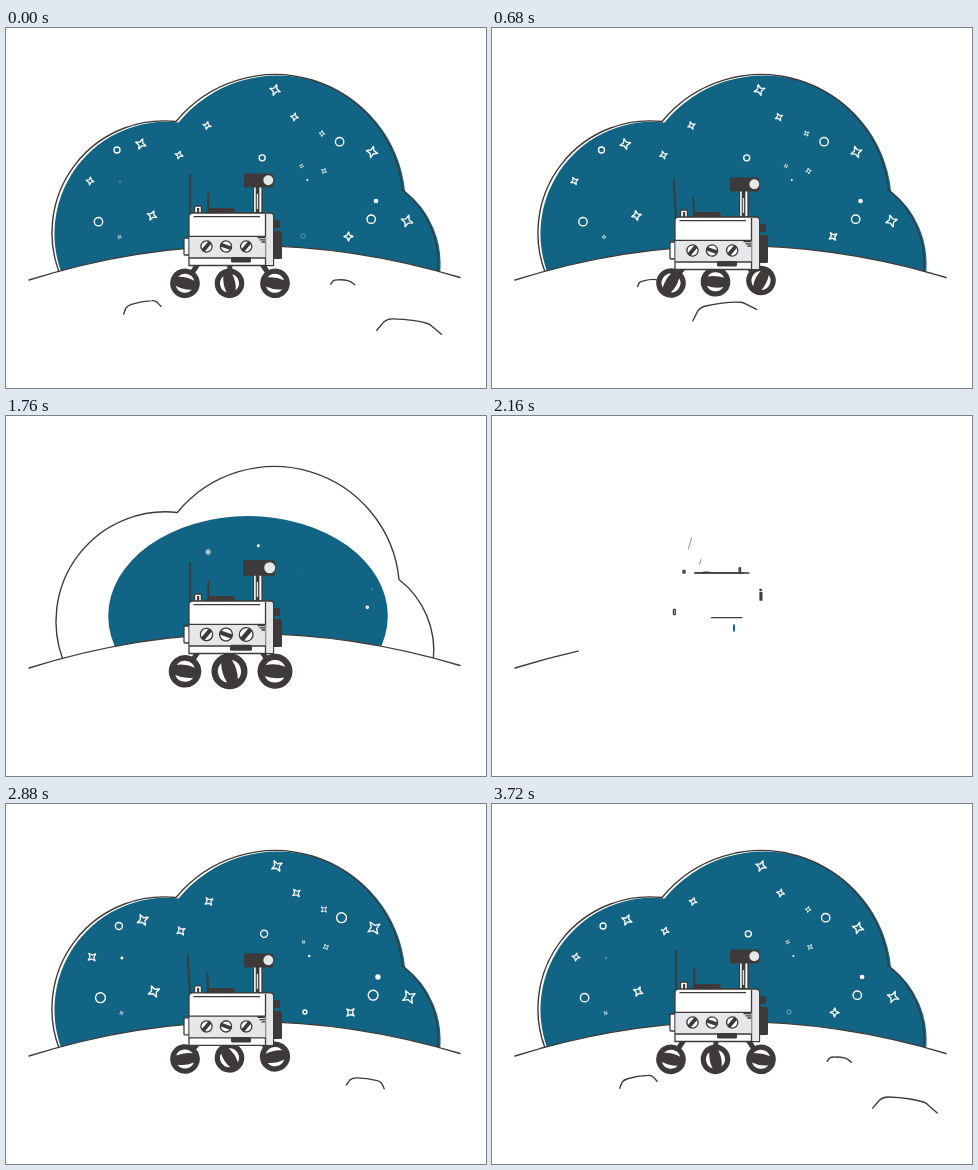
An HTML page that plays this animation: 480 px wide and 360 px high, repeating every 3.76 s.

```html
<!DOCTYPE html>
<html lang="en">
<head>
<meta charset="utf-8">
<title>Moon rover</title>
<style>
  html, body { margin: 0; width: 100%; height: 100%; overflow: hidden; background: #fff; }
  svg { display: block; width: 100vw; height: 100vh; }
  .ink { fill: none; stroke: #3d3a39; stroke-width: 1.4; stroke-linecap: round; stroke-linejoin: round; }
  .dark { fill: #3d3a39; }
  .white { fill: #fff; }
  .grey { fill: #e6e7e8; }
  .line { stroke: #3d3a39; stroke-width: 1.3; vector-effect: non-scaling-stroke; }
  .star { fill: none; stroke: #fff; stroke-width: 1.35; stroke-linejoin: round; vector-effect: non-scaling-stroke; }
  .leg { stroke: #3d3a39; stroke-width: 5; }
</style>
</head>
<body>
<svg viewBox="0 0 480 360">
  <defs>
    <path id="cloud" pathLength="1" d="M53 244A112 112 0 0 1 170 93.500A128 128 0 0 1 396.500 162A92 92 0 0 1 431.500 245"/>
    <clipPath id="iris"><ellipse id="hole" cx="242"/></clipPath>
    <clipPath id="skyClip"><use href="#cloud" transform="translate(2.500 1)"/></clipPath>
    <clipPath id="ground"><rect width="480" height="317.500"/></clipPath>
    <g id="wheel">
      <circle class="dark" r="14.800"/>
      <path class="white" d="M-8.300-4.600A9.500 9.500 0 0 1 8.300-4.600Q0-7-8.300-4.600ZM8.300 4.600A9.500 9.500 0 0 1-8.300 4.600Q0 7 8.300 4.600Z"/>
    </g>
    <g id="dial">
      <circle class="white line" r="5.600"/>
      <rect class="dark" x="-5.600" y="-1.900" width="11.200" height="3.800" rx="1"/>
    </g>
  </defs>

  <g id="backdrop">
    <g clip-path="url(#iris)">
      <g clip-path="url(#skyClip)">
        <rect width="480" height="300" fill="#126484"/>
        <g id="stars"></g>
      </g>
    </g>
    <use id="rim" href="#cloud" class="ink" stroke-dasharray="1 2"/>
  </g>

  <path class="white" d="M0 258L23 252Q238 184.500 454 249.500L480 258V360H0Z"/>
  <path id="hill" class="ink" pathLength="1" stroke-dasharray="1 2" d="M23 252Q238 184.500 454 249.500"/>

  <g clip-path="url(#ground)" id="rocks"></g>

  <g id="rover">
    <g id="legs"></g>
    <g id="wheels"></g>
    <g id="body">
      <g id="antennas"></g>
      <g data-pop="247 185 30">
        <rect class="white line" x="247.500" y="157" width="8.500" height="28"/>
        <path class="dark" d="M249.700 158h3.700v27h-3.700z"/>
        <path class="grey" d="M250.800 166h1.300v15h-1.300z"/>
      </g>
      <g data-pop="248 158 296">
        <rect class="dark" x="238" y="145.500" width="29" height="14" rx="1.500"/>
        <circle class="grey line" cx="262.300" cy="152.300" r="5.600"/>
      </g>
      <g data-pop="192 185 20">
        <rect class="white line" x="188.600" y="178" width="6.800" height="8" rx="1"/>
        <path class="dark" d="M191 180h2.200v5H191z"/>
      </g>
      <g data-pop="214 185 25"><path class="dark" d="M199 185.500L203 180H226.500Q229 180 229 185.500Z"/></g>
      <g data-pop="268 205 20">
        <rect class="dark" x="266" y="192" width="8" height="8" rx="2"/>
        <rect class="dark" x="266" y="203" width="10" height="28" rx="1.500"/>
      </g>
      <g data-pop="183 227 20"><rect class="white line" x="178" y="210" width="6" height="17" rx="1"/></g>
      <g id="shell">
        <path class="white line" d="M183 237.500V188.500Q183 185 186.500 185H264Q267.500 185 267.500 188.500V237.500Z"/>
        <path class="grey" d="M259.500 186h5q2.500 0 2.500 2.500V237h-7.500z"/>
        <path class="line" fill="none" d="M259.500 186V237M187.500 188.700H254"/>
        <path class="grey" d="M183.600 208.300H259.500V230H183.600Z"/>
        <path class="line" d="M183 208.300H259.500M251.500 209.500H259M253.500 211.800H259M255.500 214H259"/>
      </g>
      <path id="seam" class="line" d="M183 230H259.500"/>
      <g id="dials"></g>
      <g data-pop="235 231.500 296"><rect class="dark" x="225" y="229" width="20" height="5.500" rx="1.500"/></g>
    </g>
  </g>
</svg>

<script>
const LOOP = 3760, START = 2120;
const $ = id => document.getElementById(id);
const clamp = x => Math.max(0, Math.min(1, x));
const smooth = x => (x = clamp(x), x * x * (3 - 2 * x));
const set = (el, attrs) => { for (const k in attrs) el.setAttribute(k, attrs[k]); return el; };
const add = (parent, tag, attrs) =>
  set(parent.appendChild(document.createElementNS('http://www.w3.org/2000/svg', tag)), attrs);
const scaleAt = (x, y, sx, sy = sx) => `translate(${x} ${y}) scale(${sx} ${sy}) translate(${-x} ${-y})`;

// springy growth with one overshoot
function pop(q, start, dur = 360) {
  const x = clamp((q - start) / dur) - 1;
  return Math.max(0, 1 + 3.8 * x ** 3 + 2.8 * x * x);
}

// x, y, radius, tilt
const stars = [
  [269, 62, 5.5, 18], [134.8, 116, 5.4, 20], [288.5, 89, 4, 10], [201, 97.5, 4, 12],
  [173, 127, 4, 15], [84, 153, 4, 8], [146, 187.5, 5, 22], [316, 105.5, 3, 5],
  [366, 124, 5.8, 14], [401, 193, 6, 18], [342.5, 208.5, 4.5, 0], [318, 143, 2.9, 25],
  [113.5, 209, 2.1, 25], [295.5, 138, 2.2, 15]
].map(([x, y, r, tilt], i) => {
  const el = add($('stars'), 'path', {
    class: 'star', d: 'M0-1L.28-.28L1 0L.28.28L0 1L-.28.28L-1 0L-.28-.28Z',
    style: `stroke-width:${Math.min(1.35, .3 * r)}`
  });
  return { el, x, y, r, tilt, start: 520 + i * 14 };
});

// x, y, radius, filled, start, fade
const fadeOut = t => 1 - clamp((t - 1200) / 560);
const rings = [
  [111, 122, 3], [92.5, 193.7, 4.2], [256.2, 129.8, 3], [333.6, 113.7, 4.2], [365.2, 191.2, 4.2],
  [370, 173, 2.3, 1], [301.3, 152, 1, 1], [297, 208, 2, 0, 330, fadeOut],
  [114, 154, 1.2, 1, 600, fadeOut], [206, 136, 2.7, 1, 0, t => .6 * clamp((t - 2800) / 220)]
].map(([x, y, r, solid, start = 560, fade]) => {
  const el = add($('stars'), 'circle', { class: 'star', r });
  if (solid) set(el, { style: 'fill:#fff;stroke:none' });
  return { el, x, y, start, fade };
});

// outline, orbit radius, top of orbit, angle at the loop start, degrees per ms
const rocks = [
  ['M-30 17L-25 7.500Q-22 3.500-17 2.500Q5-1.800 18-.5Q21-.2 23 1.200L34 7', 735, 275, 12.41, .02],
  ['M-19 8L-16 2.500Q-14 .2-10-.4Q0-2 11-1Q14-.8 16 1.500L19 6', 743, 267, -8.55, .0198],
  ['M-11.500 5.500L-9.500 2Q-8 .7-5 .5Q0-.5 6 .2Q8 .5 12.500 3.500', 832, 247, 6.28, .0183]
].map(([d, radius, top, angle, rate]) =>
  ({ el: add($('rocks'), 'path', { class: 'ink', d }), radius, top, angle, rate }));

// x, bump height, tilt, start, hip x
const wheels = [[179, .3, 14, 296, 194], [223.5, 1.5, 78, 374, 224], [269, 2.8, 10, 432, 254]]
  .map(([x, lift, tilt, start, hip]) => ({
    x, lift, tilt, start, hip,
    leg: add($('legs'), 'line', { class: 'leg' }),
    el: add($('wheels'), 'use', { href: '#wheel' })
  }));

// foot x and y, length, flight offset
const antennas = [[184, 186, 39, 14, -28], [202.3, 183, 17.5, 6, -7]].map(([x, y, len, dx, dy]) => ({
  x, y, dx, dy, el: add($('antennas'), 'path', { class: 'ink', d: `M0 0V${-len}`, style: 'stroke-width:1.8' })
}));

const dials = [[200.5, -50, 296], [220, 20, 320], [240.2, -50, 390]]
  .map(([x, turn, start]) => ({ x, turn, start, el: add($('dials'), 'use', { href: '#dial' }) }));

const parts = [...document.querySelectorAll('[data-pop]')].map(el => [el, ...el.dataset.pop.split(' ').map(Number)]);

function drawSky(t, q) {
  const open = (q / 480) ** 3, drift = -.0022 * (t - 1640);
  set($('hole'), { cy: 212 - 12 * Math.min(1, open), rx: 1 + 81 * open, ry: 4 + 56 * open });
  set($('rim'), {
    transform: scaleAt(234, 231, .944 + .056 * smooth((q - 430) / 250)),
    'stroke-dashoffset': 1 - smooth((q - 60) / 360),
    visibility: q > 62 ? 'visible' : 'hidden'
  });
  set($('hill'), { 'stroke-dashoffset': 1 - clamp(q / 275) });
  for (const o of stars) {
    const size = o.r * pop(q, o.start, 300);
    set(o.el, { transform: `translate(${o.x + drift} ${o.y}) rotate(${o.tilt - .049 * (t - 1640)}) scale(${size})` });
  }
  for (const o of rings) {
    set(o.el, {
      transform: `translate(${o.x + drift} ${o.y}) scale(${pop(q, o.start, 300)})`,
      opacity: o.fade ? o.fade(t) : 1
    });
  }
}

function drawRover(t, q) {
  const bump = smooth((Math.cos((t - 320) * Math.PI / 200) - .35) / .5);
  const sink = 4 * bump;
  const turn = 180 * smooth((t % 400 - 220) / 180);
  set($('rover'), { transform: `translate(0 ${-38 * (1 - clamp(q / 300)) ** 2})` });
  set($('body'), { transform: `translate(0 ${sink})` });
  for (const a of antennas) {
    const away = 1 - smooth(q / 200);
    set(a.el, {
      transform: `translate(${a.x + a.dx * away} ${a.y + a.dy * away}) ` +
        `rotate(${18 * away - 3.5 * bump}) scale(${.2 + .8 * smooth(q / 200)})`,
      opacity: q > 5 ? 1 : 0
    });
  }
  set($('shell'), {
    transform: scaleAt(238, 185, clamp(q / 64), smooth((q - 30) / 220)),
    opacity: q > 5 ? 1 : 0
  });
  set($('seam'), { transform: scaleAt(244, 230, clamp(q / 100), 1), opacity: q > 5 ? 1 : 0 });
  for (const [el, x, y, start] of parts) {
    const s = pop(q, start);
    set(el, { transform: scaleAt(x, y, s), opacity: s ? 1 : 0 });
  }
  for (const d of dials) {
    const s = pop(q, d.start);
    set(d.el, { transform: `translate(${d.x} 218.500) rotate(${d.turn}) scale(${s})`, opacity: s ? 1 : 0 });
  }
  for (const w of wheels) {
    const s = pop(q, w.start), y = 255.3 - w.lift * bump, grow = clamp((q - w.start + 60) / 90);
    const spin = w.tilt + turn - 60 * (1 - clamp((q - 300) / 300));
    set(w.el, { transform: `translate(${w.x} ${y}) rotate(${spin}) scale(${s})` });
    const top = 233 + sink;
    set(w.leg, { x1: w.hip, y1: top, x2: w.hip + (w.x - w.hip) * grow, y2: top + (y - top) * grow });
  }
}

function draw(ms) {
  const t = (ms - START + LOOP) % LOOP;
  const q = Math.min(t, (LOOP - t) * 1.6);
  drawSky(t, q);
  drawRover(t, q);
  for (const r of rocks) {
    const angle = r.angle - r.rate * (t - 1640);
    set(r.el, { transform: `rotate(${angle} 246 ${r.top + r.radius}) translate(246 ${r.top})` });
  }
}

const begin = performance.now();
function tick() {
  draw((performance.now() - begin) % LOOP);
  requestAnimationFrame(tick);
}
tick();
</script>
</body>
</html>
```
